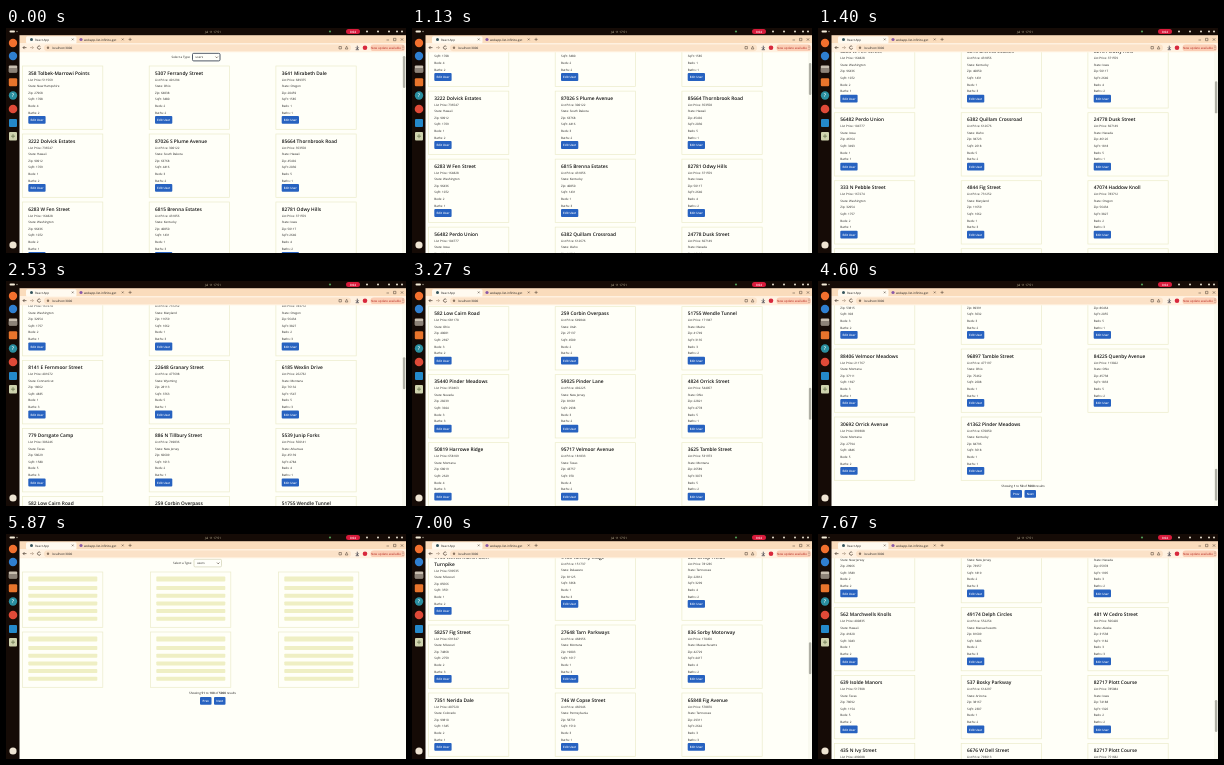
An HTML page for the animation above (8000 ms loop, 400 by 225 pixels).

```html
<!DOCTYPE html>
<html lang="en">
<head>
<meta charset="utf-8">
<style>
  html, body { margin: 0; width: 100%; height: 100%; overflow: hidden; background: #fffff8; }
  svg { display: block; width: 100%; height: 100%; }
  text { font-family: "Open Sans", "Noto Sans", sans-serif; font-size: 3px; fill: #1c1c1c; text-rendering: geometricPrecision; }
  .title { font-size: 4.8px; font-weight: 600; fill: #111; }
  .btn { font-weight: 600; fill: #fff; text-anchor: middle; }
  .mid { text-anchor: middle; }
  .card { fill: none; stroke: #ececca; stroke-width: .7; }
</style>
</head>
<body>
<svg id="stage" viewBox="0 0 400 225"></svg>
<script>
const PITCH = 68, BOTTOM = 990, FPS = 15, LOOP = 8000;
const WRAP_ROW = 7, WRAP = 7; // one title on the second page takes two lines

// Known cards as "address|state", by page and row; other rows are made up.
const known = [{
  0: '358 Tolbek-Marrowi Points|New Hampshire;5307 Ferrandy Street|Ohio;3641 Mirabeth Dale|Oregon',
  1: '3222 Dolvick Estates|Hawaii;87026 S Plume Avenue|South Dakota;85664 Thornbrook Road|Hawaii',
  2: '6283 W Fen Street|Washington;6815 Brenna Estates|Kentucky;82781 Odwy Hills|Iowa',
  3: '56482 Perdo Union|Iowa;6382 Quillam Crossroad|Idaho;24778 Dusk Street|Nevada',
  4: '333 N Pebble Street|Washington;4844 Fig Street|Maryland;47074 Haddow Knoll|Oregon',
  5: '8141 E Fernmoor Street|Connecticut;22648 Granary Street|Wyoming;6185 Wexlin Drive|Montana',
  6: '779 Dorsgate Camp|Texas;886 N Tillbury Street|New Jersey;5539 Junip Forks|Arkansas',
  7: '582 Low Cairn Road|Ohio;259 Corbin Overpass|Utah;51755 Wendle Tunnel|Maine',
  10: '481 W Cedro Street|Alaska;33969 Pimm Square|Rhode Island;8462 N Dell|Colorado',
  11: '31287 Tormelly Burg|Kentucky;67527 N Ridge Street|New Mexico;42713 Gandolwick Hollow|Arkansas',
  12: '5457 Bramer Corner|Hawaii;58681 Fintray Knoll|Oregon;719 Moth Street|Idaho'
}, {
  7: '9153 Wintermarsh Glen~Turnpike|Missouri;4186 Tansley Ridge|Delaware;628 Orlop Fields|Tennessee',
  8: '58257 Fig Street|Missouri;27648 Tarn Parkways|Montana;836 Sorby Motorway|Massachusetts',
  9: '7351 Nerida Dale|Colorado;746 W Copse Street|Pennsylvania;65848 Fig Avenue|Tennessee',
  13: '562 Marchwells Knolls|Hawaii;49174 Delph Circles|Massachusetts;481 W Cedro Street|Alaska',
  14: '639 Isolde Manors|Texas;537 Bosky Parkway|Arizona;82717 Plott Course|Iowa',
  15: '435 N Ivy Street|Ohio;6676 W Dell Street|Utah;82717 Plott Course|Iowa'
}];
const words = ['Tamble', 'Orrick', 'Velmoor', 'Pinder', 'Quenby', 'Harrowe', 'Sedgel'];
const kinds = ['Street', 'Avenue', 'Meadows', 'Ridge', 'Estates', 'Lane'];
const states = ['Ohio', 'Texas', 'Montana', 'Nevada', 'Kentucky', 'New Jersey'];

let seed = 7;
const rand = (lo, hi) => {
  seed = (seed * 16807) % 2147483647;
  return lo + seed % (hi - lo);
};
const pick = list => list[rand(0, list.length)];

const text = (x, y, s, cls = '', more = '') => `<text x="${x}" y="${y}" class="${cls}" ${more}>${s}</text>`;
const rect = (x, y, w, h, fill, r = 0, more = '') =>
  `<rect x="${x}" y="${y}" width="${w}" height="${h}" rx="${r}" fill="${fill}" ${more}/>`;
const dot = (x, y, r, fill) => `<circle cx="${x}" cy="${y}" r="${r}" fill="${fill}"/>`;
const line = (d, color = '#4a3c30', w = .7) => `<path d="${d}" fill="none" stroke="${color}" stroke-width="${w}"/>`;
const bold = s => `<tspan font-weight="600">${s}</tspan>`;
const frame = (x, y, h) => `<rect class="card" x="${x}" y="${y}" width="80.3" height="${h}"/>`;
const button = (x, y, w, label) => rect(x, y, w, 7.8, '#2762c0', 1) + text(x + w / 2, y + 5, label, 'btn');

function card(x, y, extra, entry) {
  const [address, state] = entry.split('|');
  const lines = address.split('~');
  const left = x + 5.8;
  const top = y + 6.5 + (lines.length - 1) * WRAP;
  const facts = ['List Price: ' + rand(100000, 800000), 'State: ' + state, 'Zip: ' + rand(10000, 99999),
    'SqFt: ' + rand(900, 4900), 'Beds: ' + rand(1, 6), 'Baths: ' + rand(1, 4)];
  return frame(x, y, 63.3 + extra) +
    lines.map((s, i) => text(left, y + 8.5 + i * WRAP, s, 'title')).join('') +
    facts.map((s, i) => text(left, top + 8 + i * 6.6, s)).join('') +
    button(left, top + 43.5, 17.3, 'Edit User');
}

function header(mid, focused) {
  const ring = focused ? 'stroke="#3c4656" stroke-width=".9"' : 'stroke="#c9c9a8" stroke-width=".6"';
  return text(mid - 39.5, 30.3, 'Select a Type:') +
    rect(mid - 18.5, 25.3, 27.5, 7.6, '#fffffa', 1.2, ring) +
    text(mid - 15.5, 30.3, 'users') + line(`M${mid + 4.5} 28.6l1.2 1.2 1.2-1.2`);
}

function footer(mid, y, from, to) {
  return text(mid, y + 6.8, `Showing ${bold(from)} to ${bold(to)} of ${bold(5000)} results`, 'mid') +
    button(mid - 12.5, y + 10, 11.5, 'Prev') + button(mid + 1.5, y + 10, 11.5, 'Next');
}

function listPage(n) {
  let out = header(205, n === 0);
  for (let i = 0; i < 50; i++) {
    const row = Math.floor(i / 3), col = i % 3;
    const made = `${rand(200, 99999)} ${pick(words)} ${pick(kinds)}|${pick(states)}`;
    const entry = known[n][row] ? known[n][row].split(';')[col] : made;
    const shift = n && row > WRAP_ROW ? WRAP : 0;
    const extra = n && row === WRAP_ROW ? WRAP : 0;
    out += card(16.5 + col * 126.7, 38 + row * PITCH + shift, extra, entry);
  }
  return out + footer(205, 1189 + n * WRAP, n * 50 + 1, n * 50 + 50);
}

function loadingPage() {
  let out = header(206.5, false);
  for (let i = 0; i < 6; i++) {
    const x = 16.5 + (i % 3) * 128, y = 38 + Math.floor(i / 3) * 60;
    out += frame(x, y, 55.3);
    for (let k = 0; k < 6; k++) {
      out += rect(x + 5.8, y + (k ? 6.3 + k * 7.7 : 4.6), 69, k ? 4 : 5, '#efefc4', .8);
    }
  }
  return out + footer(206.5, 153, 51, 100);
}

function chrome() {
  const dark = '#150b06', ink = '#4a3c30';
  return rect(13, 7, 387, 8.5, '#fadcbc') + rect(13, 15, 387, 9.3, '#fff1e0') +
    // tabs
    rect(20, 8.3, 50.5, 7.2, '#fffaf0', 1.5) + dot(25.5, 11.5, 1.5, '#35545c') +
    text(29, 12.5, 'React App') + line('M65.8 10.5l1.8 1.8m0-1.8l-1.8 1.8', ink, .5) +
    dot(75, 11.5, 1.6, '#8a5aa8') + text(78, 12.5, 'webapp-list-infinite-get') +
    line('M115.8 10.5l1.8 1.8m0-1.8l-1.8 1.8', ink, .5) + line('M122.5 11.4h3.2m-1.6-1.6v3.2', ink, .5) +
    line('M380.5 12h2.5M387.5 10.3h2.4v2.4h-2.4zM394.8 10.3l2.4 2.4m0-2.4l-2.4 2.4', ink, .5) +
    // toolbar
    line('M20.5 19.6h-3.5m1.5-1.5l-1.5 1.5 1.5 1.5') + line('M24 19.6h3.5m-1.5-1.5l1.5 1.5-1.5 1.5', '#b3a08c') +
    line('M34.4 18.7a1.6 1.6 0 1 0 .2 1.4') +
    rect(38, 16.4, 307, 6.8, '#fbe2c8', 3.4) + dot(42, 19.8, 1.2, '#8a7561') + text(46, 20.9, 'localhost:3000') +
    line('M333 18.5h2.4v2.4h-2.4zM339.3 21l1.3-2.8 1.3 2.8z', ink, .5) +
    line('M351.3 17.7v3m-1.4-1.3l1.4 1.4 1.4-1.4m-3 2.3h3.2', '#2c2c3a') + dot(359, 19.7, 2.3, '#d8283c') +
    rect(364.5, 16.6, 34.5, 6.5, '#fbcdb4', 3.2) +
    text(380, 20.9, 'New update available', 'mid', 'style="fill:#b3261e"') +
    [18, 19.8, 21.6].map(y => dot(397, y, .45, ink)).join('') +
    // desktop bar and dock
    rect(0, 0, 400, 7.2, dark) + rect(0, 7, 13.5, 218, dark) +
    rect(3.5, 2.5, 5.5, 2, '#f4ecd8', 1) + dot(11, 3.5, .8, '#8f887c') +
    text(207, 4.6, 'Jul 11 17:51', 'mid', 'style="fill:#d8cfae"') +
    dot(324, 3.5, 1.1, '#4f9a56') +
    rect(340, .9, 14, 5, '#d81b3c', 2.5) + text(347, 4.5, '0:04', 'btn') +
    [361, 372, 383, 391, 396].map(x => dot(x, 3.5, 1, '#e8e0d0')).join('') +
    dot(7, 15, 4.2, '#f2702e') + dot(7, 28, 4.2, '#2f7fd0') +
    rect(2.8, 37.6, 8.4, 7, '#c9bfb0', 1) + rect(2.8, 40, 8.4, 4.6, '#8d8378', 1) +
    rect(2.8, 50.3, 8.4, 8, '#e8752c', 1.2) +
    dot(7, 67.5, 4.2, '#2a8fa0') + text(7, 69.3, '?', 'btn', 'style="font-size:5px"') +
    dot(7, 81, 4.3, '#df4a38') + rect(3, 91, 8, 8, '#2489ca', 1) +
    rect(3, 104, 8, 8.4, '#cfd3ae', 1) + line('M5 108.2h4m-2-2v4', '#6f7a55', .8) +
    dot(7, 217, 3.6, '#eee4d2');
}

const pages = [listPage(0), loadingPage(), listPage(1)];
document.getElementById('stage').innerHTML = rect(0, 0, 400, 225, '#fffff8') +
  pages.map(p => `<g class="page">${p}</g>`).join('') +
  `<g id="bar">${rect(396, 24, 4, 201, '#fafaf0')}<rect id="thumb" x="396.9" width="2.4" height="32" rx="1.2" fill="#b0b0a6"/></g>` +
  chrome();
const groups = document.querySelectorAll('.page');
const bar = document.getElementById('bar'), thumb = document.getElementById('thumb');

// Wheel gestures: start tick, end tick, scroll from, scroll to.
const gestures = [
  [16, 24, 0, 183], [27, 32, 183, 239], [37, 42, 239, 404], [48, 54, 404, 680], [56, 61, 680, BOTTOM],
  [90, 93, 0, 190], [99, 105, 190, 498], [107, 112, 498, 855.5]
];
const LOADING = 83, LOADED = 90;

function scrollAt(tick) {
  let y = 0;
  for (const [a, b, from, to] of gestures) {
    if (tick < a) break;
    const left = 1 - Math.min(1, (tick - a) / (b - a));
    y = to - (to - from) * left * left;
  }
  return y;
}

function draw(now) {
  const tick = Math.floor((now % LOOP) / 1000 * FPS + .1);
  const view = tick < LOADING ? 0 : tick < LOADED ? 1 : 2;
  const y = view === 1 ? 0 : scrollAt(tick);
  groups.forEach((g, i) => g.setAttribute('display', i === view ? 'inline' : 'none'));
  groups[view].setAttribute('transform', `translate(0 ${-y})`);
  bar.setAttribute('display', view === 1 ? 'none' : 'inline');
  thumb.setAttribute('y', 28 + y / 6.2);
  requestAnimationFrame(draw);
}
draw(0);
</script>
</body>
</html>
```
